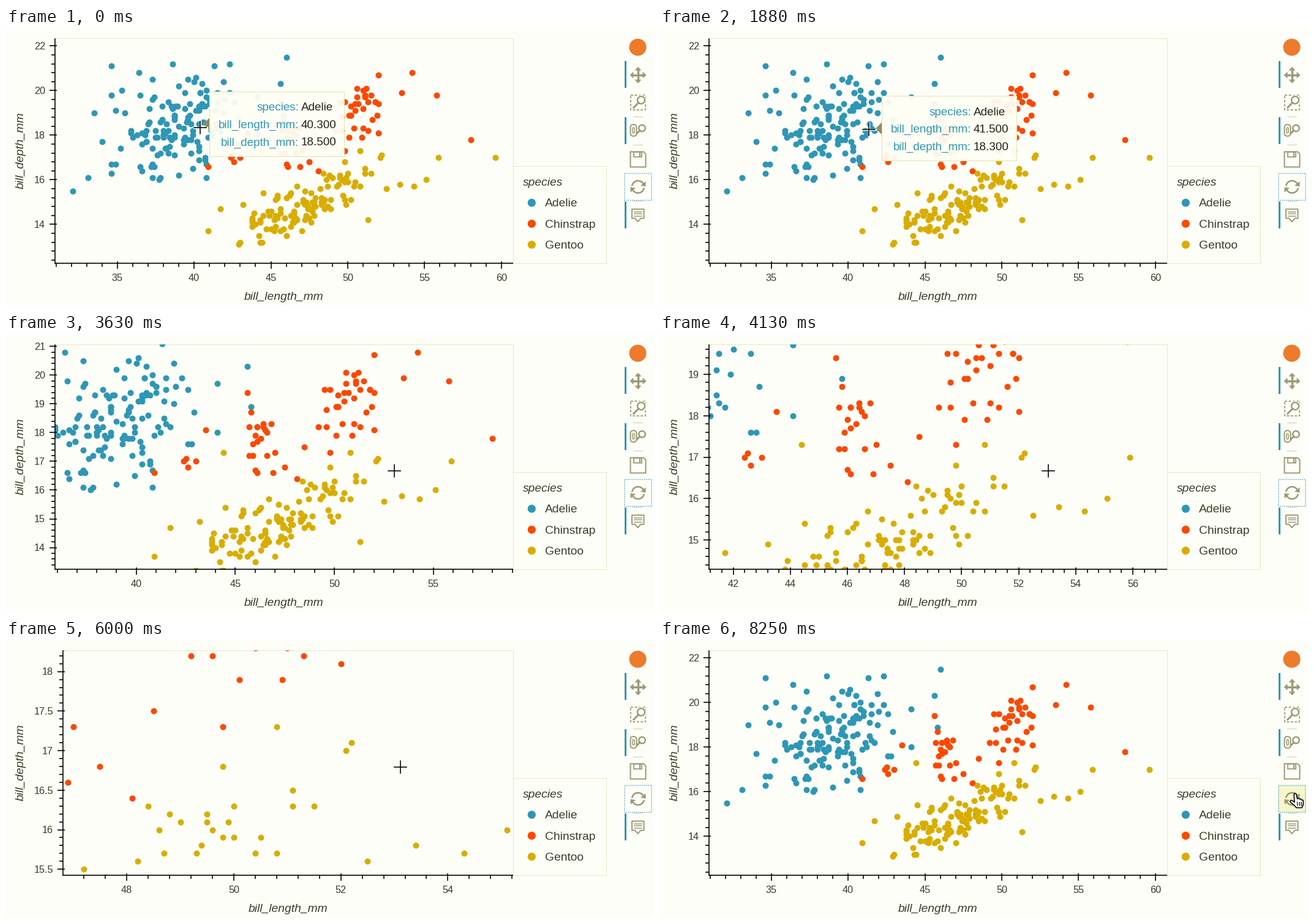
Write a matplotlib script that moves like this. It is 1058 px wide and 455 px high and loops after 8370 ms.

```python
import numpy as np
import matplotlib.pyplot as plt
from matplotlib.animation import FuncAnimation
from matplotlib.collections import LineCollection
from matplotlib.patches import Arc, Circle, FancyBboxPatch, Polygon, Rectangle

W, H, DPI = 1058, 455, 64
LOOP_MS, FRAMES = 8370, 67
PT = 72 / DPI  # points per pixel

BG, INK, BORDER = "#fefef8", "#3c3b28", "#e9e8c2"
BLUE, RED, GOLD = "#2e96b6", "#fb4800", "#d8ad00"
ICON, HOVER = "#9c9b76", "#f6f5cc"
TOP, BOTTOM, RIGHT = 17, 385, 828
SMALL, LARGE, TIP = 16.3, 19.3, 18.9
RESET = 63

plt.rcParams["font.family"] = "Liberation Sans"
fig = plt.figure(figsize=(W / DPI, H / DPI), dpi=DPI, facecolor=BG)
ax = fig.add_axes([0, 0, 1, 1])
ax.set(xlim=(0, W), ylim=(H, 0))
ax.axis("off")


# ---------- data ----------
def cloud(rng, count, mean, sd, slope, xlim, ylim, reject):
    """Rounded scatter around a sloped line, kept inside limits."""
    pts = []
    while len(pts) < count:
        x = rng.normal(mean[0], sd[0])
        y = mean[1] + slope * (x - mean[0]) + rng.normal(0, sd[1])
        x, y = round(x, 1), round(y, 1)
        inside = xlim[0] <= x <= xlim[1] and ylim[0] <= y <= ylim[1]
        if inside and not reject(x, y):
            pts.append((x, y))
    return pts


def zoom_area(x, y):
    return x > 46.8 and 15.4 < y < 18.3


def hover_area(x, y):
    return 39.9 < x < 41.7 and 18.05 < y < 18.75


rng = np.random.default_rng(12)
adelie = [(46, 21.5), (45.6, 20.3), (44.1, 19.7), (45.8, 18.9), (44.1, 18),
          (34.6, 21.1), (33.5, 19), (33.1, 16.1), (32.1, 15.5), (42.3, 21.2),
          (38.6, 21.2), (41.3, 21.1), (37.3, 20.5), (37.7, 16), (40.3, 18.5),
          (40.6, 18.6), (41.1, 18.2), (41.5, 18.3), (41.4, 18.5)]
adelie += cloud(rng, 130, (38.8, 18.25), (2.5, 1.05), 0.15,
                (34, 43.2), (15.9, 20.8), hover_area)

chinstrap = [(49.2, 18.2), (49.6, 18.2), (51.3, 18.2), (52, 18.1), (50.1, 17.9),
             (50.9, 17.9), (48.5, 17.5), (47, 17.3), (49.8, 17.3), (47.5, 16.8),
             (46.9, 16.6), (48.1, 16.4), (58, 17.8), (55.8, 19.8), (54.2, 20.8),
             (52, 20.7), (53.5, 19.9), (45.6, 19.4), (40.9, 16.6), (43.5, 18.1)]
chinstrap += cloud(rng, 18, (46, 17.6), (0.5, 0.7), 0.3,
                   (45.2, 46.8), (16.5, 18.9), zoom_area)
chinstrap += cloud(rng, 4, (42.6, 17), (0.3, 0.3), 0,
                   (42.2, 43.2), (16.6, 17.4), zoom_area)
chinstrap += cloud(rng, 26, (50.8, 19.2), (1, 0.5), 0.2,
                   (49, 52.8), (18.3, 20.3), zoom_area)

gentoo = [(47.2, 15.5), (48.2, 15.6), (48.7, 15.7), (48.6, 16), (48.4, 16.3),
          (48.8, 16.2), (49, 16.1), (49.3, 15.7), (49.4, 15.8), (49.5, 16.1),
          (49.5, 16.2), (49.6, 16), (49.8, 15.9), (50, 15.9), (49.9, 16.1),
          (50, 16.3), (49.8, 16.8), (50.5, 15.9), (50.4, 15.7), (50.8, 15.7),
          (50.8, 17.3), (51.1, 16.5), (51.1, 16.3), (51.5, 16.3), (52.1, 17),
          (52.2, 17.1), (52.5, 15.6), (53.4, 15.8), (54.3, 15.7), (55.1, 16),
          (55.9, 17), (59.6, 17), (44.4, 17.3), (51.3, 14.2), (41.7, 14.7),
          (40.9, 13.7), (42.9, 13.1)]
gentoo += cloud(rng, 86, (46.6, 14.65), (2.2, 0.55), 0.24,
                (42, 50.8), (13.2, 16.1), zoom_area)

SPECIES = [("Adelie", BLUE, np.array(adelie)),
           ("Chinstrap", RED, np.array(chinstrap)),
           ("Gentoo", GOLD, np.array(gentoo))]


# ---------- drawing helpers ----------
def label(x, y, text, size, color=INK, ha="left", z=5, **kw):
    """Text whose capitals are centred on y."""
    return ax.text(x, y + 0.36 * size, text, size=size * PT, color=color,
                   ha=ha, va="baseline", zorder=z, **kw)


def line(xs, ys, width=2, color=ICON, z=5, **kw):
    return ax.plot(xs, ys, color=color, lw=width * PT, zorder=z, **kw)[0]


def patch(shape):
    return ax.add_patch(shape)


def box(x0, y0, x1, y1, z=1, width=1, **kw):
    return patch(Rectangle((x0, y0), x1 - x0, y1 - y0, lw=width * PT, zorder=z, **kw))


def poly(pts, z=5, width=0, **kw):
    return patch(Polygon(pts, closed=True, lw=width * PT, zorder=z, **kw))


def magnifier(x, y, r, tail):
    patch(Circle((x, y), r, fill=False, ec=ICON, lw=2.4 * PT, zorder=5))
    d = 0.7 * r
    line([x - d, x - d - tail], [y + d, y + d + tail], 3)


def draw_legend():
    box(RIGHT, 225.5, 979.5, 385, fc="none", ec=BORDER)
    label(844, 251, "species", LARGE, style="italic")
    for i, (name, color, _) in enumerate(SPECIES):
        y = 286 + 34.3 * i
        patch(Circle((858.3, y), 6.6, fc=color, lw=0, zorder=5))
        label(880, y - 0.6, name, LARGE)


def draw_toolbar():
    patch(Circle((1031.5, 31.5), 14, fc="#ee7a2c", lw=0, zorder=5))
    for y in (54, 146, 284):
        box(1009.5, y, 1012.5, y + 44, fc=BLUE, lw=None, ec="none", z=4) \
            if False else poly([(1009.5, y), (1012.5, y), (1012.5, y + 44), (1009.5, y + 44)], 4, fc=BLUE)
    for y in (145, 191, 283):
        line([1024, 1039], [y, y], 1, "#cfceaa")
    box(1009.5, 238, 1054, 282, z=4, width=1.6, fc="none", ec="#6db3cd", ls=(0, (1, 1)))

    # pan
    x, y = 1032, 77
    line([x - 10, x + 10], [y, y], 3.4)
    line([x, x], [y - 10, y + 10], 3.4)
    for dx, dy in ((1, 0), (-1, 0), (0, 1), (0, -1)):
        poly([(x + 13.5 * dx, y + 13.5 * dy),
              (x + 7.5 * dx + 5.5 * dy, y + 7.5 * dy + 5.5 * dx),
              (x + 7.5 * dx - 5.5 * dy, y + 7.5 * dy - 5.5 * dx)], fc=ICON)

    # box zoom
    box(1020, 110, 1044, 134, z=4, width=1.8, fc="none", ec=ICON, ls=(0, (2.2, 1.4)))
    patch(Circle((1037, 118), 8.5, fc=BG, lw=0, zorder=4))
    magnifier(1037, 118, 6, 8)

    # wheel zoom
    patch(FancyBboxPatch((1023, 163), 3, 9, boxstyle="round,pad=0,rounding_size=1.5",
                         mutation_aspect=1, fc="none", ec=ICON, lw=1.5 * PT, zorder=5))
    patch(FancyBboxPatch((1019.5, 158), 10, 19, boxstyle="round,pad=0,rounding_size=5",
                         fc="none", ec=ICON, lw=2 * PT, zorder=5))
    magnifier(1038.5, 164, 5.3, 4.5)

    # save
    poly([(1019.5, 202.5), (1041, 202.5), (1044.5, 206), (1044.5, 227.5),
          (1019.5, 227.5)], width=2, fc="none", ec=ICON)
    box(1025, 203, 1038, 211, z=5, width=1.8, fc="none", ec=ICON)
    line([1034.5, 1034.5], [204.5, 209], 2.2)

    # reset
    for start in (190, 10):
        patch(Arc((1032, 260), 20, 20, theta1=start, theta2=start + 140,
                  ec=ICON, lw=2.6 * PT, zorder=5))
    poly([(1044.5, 251), (1044.5, 259.5), (1036, 258)], fc=ICON)
    poly([(1019.5, 269), (1019.5, 260.5), (1028, 262)], fc=ICON)

    # hover tool
    poly([(1022, 296.5), (1041.5, 296.5), (1041.5, 311.5), (1036.5, 311.5),
          (1031.7, 317), (1027, 311.5), (1022, 311.5)], width=2, fc="none",
         ec=ICON, joinstyle="round")
    for y in (300.5, 304, 307.5):
        line([1025.5, 1038], [y, y], 1.5)


draw_legend()
draw_toolbar()
save_bg = box(1009, 193, 1054, 238, z=0.5, fc=HOVER, ec="none")
reset_bg = box(1009, 238, 1054, 282, z=0.5, fc=HOVER, ec="none")
frame_box = box(80, TOP, RIGHT, BOTTOM, fc="none", ec=BORDER)
x_title = label(454, 438, "bill_length_mm", LARGE, ha="center", style="italic")
ax.text(29, 200.5, "bill_depth_mm", size=LARGE * PT, color=INK, ha="center",
        va="baseline", rotation=90, rotation_mode="anchor", style="italic")
dots = [ax.scatter([0] * len(p), [0] * len(p), s=(10 * PT) ** 2, c=c, lw=0, zorder=3)
        for _, c, p in SPECIES]
axis_lines = ax.add_collection(
    LineCollection([], colors="black", linewidths=1.6 * PT, zorder=4))


# ---------- motion ----------
def zoom(n):
    if n >= RESET:
        return 1.0
    return np.exp(np.interp(n, [26, 29, 33, 38], np.log([1, 0.776, 0.538, 0.282])))


def cursor(n):
    keys = [0, 5, 10, 15, 18, 24, 38, 40, 47, 52, 55, 56, 66]
    xs = [317, 318, 330, 341, 375, 634, 634, 605, 605, 800, 1030, 1037, 1037]
    ys = [163, 162, 164, 166, 178, 224, 224, 212, 212, 190, 214, 249, 251]
    return np.interp(n, keys, xs), np.interp(n, keys, ys)


def tick_step(span):
    """Interval of 1, 2 or 5 times a power of ten giving close to six ticks."""
    steps = [m * 10.0 ** e for e in (-1, 0, 1) for m in (1, 2, 5)]
    return min(steps, key=lambda s: abs(6 - span / s))


def ticks(lo, hi):
    """Yields (value, is_major) over the range."""
    step = tick_step(hi - lo) / 5
    for k in range(int(np.ceil(lo / step)), int(np.floor(hi / step)) + 1):
        yield round(k * step, 6), k % 5 == 0


live = []


def draw_axes(left, xr, yr, to_x, to_y):
    segs = [[(left, TOP), (left, BOTTOM + 0.8)], [(left, BOTTOM), (RIGHT, BOTTOM)]]
    for v, major in ticks(*xr):
        x = to_x(v)
        segs.append([(x, BOTTOM - 3 * major), (x, BOTTOM + (9 if major else 6))])
        if major:
            live.append(label(x, 408, f"{v:g}", SMALL, ha="center"))
    for v, major in ticks(*yr):
        y = to_y(v)
        segs.append([(left + 3 * major, y), (left - (9 if major else 6), y)])
        if major:
            live.append(label(left - 16, y, f"{v:g}", SMALL, ha="right"))
    axis_lines.set_segments(segs)


def draw_tooltip(name, point, px, py, left):
    values = [name, f"{point[0]:.3f}", f"{point[1]:.3f}"]
    texts = [label(0, py + dy, v, TIP, "#222218", z=9)
             for v, dy in zip(values, (-28.5, 0, 28.5))]
    width = 162 + max(t.get_window_extent().width for t in texts)
    side = 1 if px < (left + RIGHT) / 2 else -1
    edge = px + 17.3 * side
    x0 = edge if side > 0 else edge - width
    live.extend(texts)
    live.append(box(x0, py - 53, x0 + width, py + 53, z=8, fc="#fefef4",
                    ec="#e2e1b4", alpha=0.95))
    live.append(poly([(edge, py - 10), (edge - 10 * side, py), (edge, py + 10)],
                     z=8, fc="#8f8e62"))
    for t, key, dy in zip(texts, ("species:", "bill_length_mm:", "bill_depth_mm:"),
                          (-28.5, 0, 28.5)):
        t.set_x(x0 + 150)
        live.append(label(x0 + 146, py + dy, key, TIP, BLUE, "right", z=9))


def draw_cursor(x, y, left):
    if x > 1009:
        shape = [(-2, 1.5), (0, 0), (2, 1.5), (3.5, 9), (5, 8), (7, 9.5), (9, 9),
                 (10.5, 11), (12, 10.5), (13.5, 13), (13, 19), (11, 23.5), (2, 23.5),
                 (-2, 19), (-8, 14), (-7.5, 11.5), (-5, 11.5), (-1, 14.5)]
        live.append(poly([(x + a, y + b) for a, b in shape], 12, 1.6,
                         fc="white", ec="black", joinstyle="round"))
        for k in (3.5, 7, 10):
            live.append(line([x + k, x + k + 0.5], [y + 14.5, y + 20], 1.2, "black", 13))
    elif left < x < RIGHT:
        for width, color, r in ((3.4, "white", 10.5), (1.6, "black", 10)):
            live.append(line([x - r, x + r], [y, y], width, color, 12))
            live.append(line([x, x], [y - r, y + r], width, color, 12))
    else:
        shape = [(0, 0), (0, 17), (4, 13.5), (6.5, 19), (9, 18), (6.5, 12.5), (12, 12.5)]
        live.append(poly([(x + a, y + b) for a, b in shape], 12, 1.2,
                         fc="black", ec="white"))


def update(n):
    while live:
        live.pop().remove()

    s = zoom(n)
    xr = 53.04 - 22.1 * s, 53.04 + 7.73 * s
    yr = 16.668 - 4.408 * s, 16.668 + 5.672 * s
    left = 93 if tick_step(yr[1] - yr[0]) < 1 else 80

    def to_x(v):
        return left + (v - xr[0]) / (xr[1] - xr[0]) * (RIGHT - left)

    def to_y(v):
        return BOTTOM - (v - yr[0]) / (yr[1] - yr[0]) * (BOTTOM - TOP)

    frame_box.set_x(left)
    frame_box.set_width(RIGHT - left)
    x_title.set_x((left + RIGHT) / 2)
    draw_axes(left, xr, yr, to_x, to_y)

    cx, cy = cursor(n)
    best = (7, None)
    clip = Rectangle((left, BOTTOM), RIGHT - left, TOP - BOTTOM, transform=ax.transData)
    for (name, _, pts), dot in zip(SPECIES, dots):
        px, py = to_x(pts[:, 0]), to_y(pts[:, 1])
        dot.set_offsets(np.column_stack([px, py]))
        dot.set_clip_path(clip)
        dist = np.hypot(px - cx, py - cy)
        i = dist.argmin()
        if dist[i] < best[0]:
            best = (dist[i], (name, pts[i], px[i], py[i]))
    if best[1] and left < cx < RIGHT:
        draw_tooltip(*best[1], left)

    # button highlight trails the pointer by one step
    bx, by = cursor(max(n - 1, 0))
    save_bg.set_visible(bx > 1009 and 193 <= by < 238)
    reset_bg.set_visible(bx > 1009 and 238 <= by < 282)
    draw_cursor(cx, cy, left)
    return []


anim = FuncAnimation(fig, update, frames=FRAMES, init_func=lambda: [],
                     interval=LOOP_MS / FRAMES, repeat=True, repeat_delay=0, blit=False)
plt.show()
```
